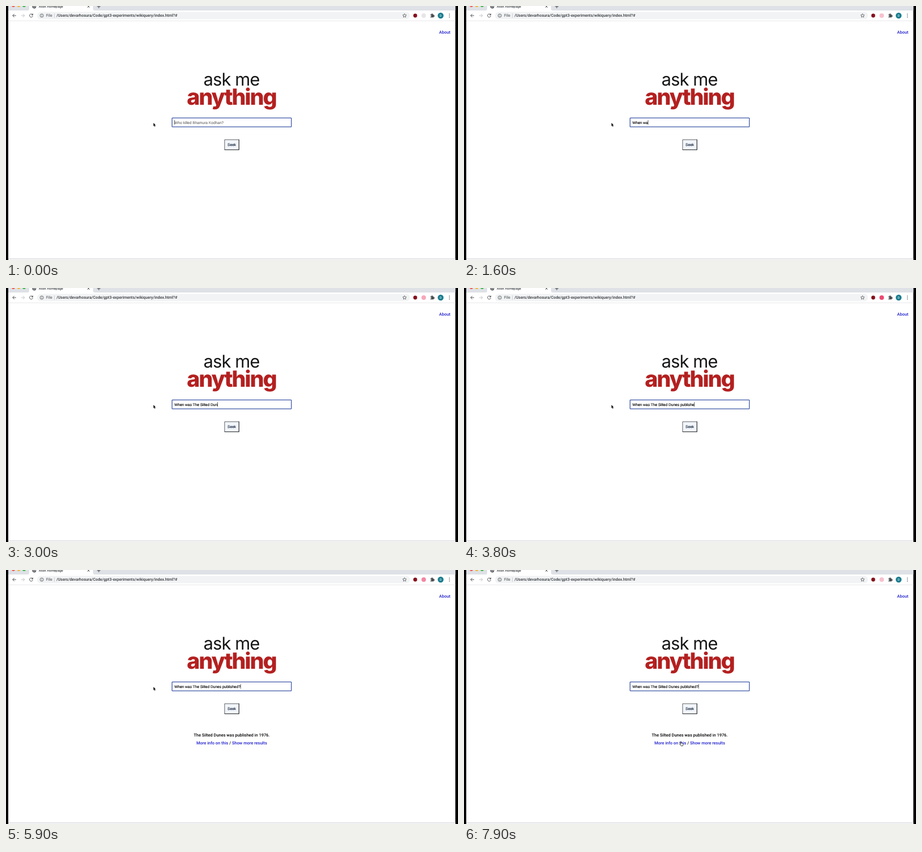
An HTML page that plays this animation: 800x450 px, repeating every 8 s.

```html
<!DOCTYPE html>
<html lang="en">
<head>
<meta charset="utf-8">
<title>AMA Homepage</title>
<style>
  html, body { margin: 0; width: 100%; height: 100%; overflow: hidden; background: #fff; }
  svg { display: block; width: 800px; height: 450px; }
  text { text-rendering: geometricPrecision; white-space: pre; }
  .ui { font-family: Roboto, sans-serif; font-weight: 500; }
  .page { font: 500 7.43px Roboto, sans-serif; fill: #000; }
  .field { font: 6.6px "Liberation Sans", Arial, sans-serif; stroke-width: .15px; }
  .logo { font-family: Inter, sans-serif; }
  .page .link, .link { fill: #1f1fcc; }
  .line { fill: none; stroke: #4a4d51; stroke-width: 1; }
  .thin { stroke-width: .8; }
  .faded { stroke: #c3c5c8; }
</style>
</head>
<body>
<svg viewBox="0 0 800 450">
  <rect width="800" height="450" fill="#000"/>
  <rect x="4" width="791.3" height="450" fill="#fff"/>

  <!-- tab strip -->
  <rect x="4" width="791.3" height="8" fill="#dee1e6"/>
  <path d="M38 8Q41 8 41 4.5V0H154V4.5Q154 8 157 8Z" fill="#fff"/>
  <circle cx="13" cy="-1" r="3" fill="#f2564d"/>
  <circle cx="22.5" cy="-1" r="3" fill="#f3b52f"/>
  <circle cx="32" cy="-1" r="3" fill="#35b944"/>
  <circle cx="50" cy="1" r="3.4" fill="#55585c"/>
  <path d="M48 0L50 1.5L49 3.5M51.5-1L52 2" stroke="#fff" stroke-width=".8" fill="none"/>
  <text class="ui" x="58" y="3" font-size="5.85" fill="#45494d">AMA Homepage</text>
  <path class="line" d="M144 -1.2L148 2.8M148 -1.2L144 2.8M161.2 1H167.2M164.2 -2V4"/>

  <!-- toolbar -->
  <path d="M4 26.3H795.3" stroke="#e3e4e6" stroke-width=".8"/>
  <rect x="55" y="10.4" width="660" height="13.2" rx="6.6" fill="#f1f3f4"/>
  <path class="line" d="M17.8 17H11.8M14.6 14.1L11.7 17L14.6 19.9"/>
  <path class="line faded" d="M26.8 17H32.8M30 14.1L32.9 17L30 19.9"/>
  <path class="line" d="M47 15.3A2.9 2.9 0 1 0 47.4 17.8M47.5 13.6V16H45"/>
  <circle class="line thin" cx="63.3" cy="17" r="3"/>
  <path class="line thin" d="M63.3 16.6V18.7M63.3 15.2V16"/>
  <g class="ui" font-size="6.95">
    <text x="71" y="19.4" fill="#63676b">File</text>
    <text x="89.3" y="19.4" fill="#303337">/Users/devarhosura/Code/gpt3-experiments/wikiquery/index.html?#</text>
  </g>
  <path d="M85.7 13.2V21" stroke="#bfc2c6" stroke-width=".8"/>
  <path id="star" class="line thin"/>
  <circle cx="724.3" cy="17" r="3.4" fill="#85101d"/>
  <circle id="rec" cx="739.3" cy="17" r="4"/>
  <path d="M751.2 15H753A1.2 1.2 0 1 1 755.2 15H757V16.6A1.2 1.2 0 1 1 757 18.7V20.3H751.2V18.6A1.1 1.1 0 1 0 751.2 16.6Z" fill="#4a4d51"/>
  <circle cx="769.3" cy="17" r="5.2" fill="#1c7d8f"/>
  <text class="ui" x="769.3" y="19" font-size="5.3" text-anchor="middle" fill="#d3edf0">D</text>
  <g fill="#4a4d51">
    <circle cx="784.8" cy="14.3" r=".8"/><circle cx="784.8" cy="17" r=".8"/><circle cx="784.8" cy="19.7" r=".8"/>
  </g>

  <!-- page -->
  <text class="page link" x="786.5" y="49.2" text-anchor="end">About</text>
  <text class="logo" x="349.6" y="140.6" font-size="31" letter-spacing="-.95" fill="#161616">ask me</text>
  <text class="logo" x="320" y="175" font-size="39.5" font-weight="800" letter-spacing="-2.1" fill="#b42020">anything</text>

  <rect x="293.9" y="198.4" width="211.2" height="15.8" rx=".8" fill="#fff" stroke="#3d56a6" stroke-width="1.3"/>
  <text id="query" class="field" x="298" y="208.5"></text>
  <rect id="caret" y="202.3" width=".7" height="7.8" fill="#111"/>

  <rect id="face" y="236.8" height="18.2" fill="#f2f6fb"/>
  <path id="light" fill="none" stroke-width=".9"/>
  <path id="dark" fill="none" stroke-width="1.1"/>
  <text id="label" class="field" x="399.6" y="248.2" text-anchor="middle"></text>

  <g id="answer" class="page" text-anchor="middle">
    <text x="399.5" y="295.2">The Silted Dunes was published in 1976.</text>
    <text x="399.5" y="308.9"><tspan class="link">More info on this</tspan> / <tspan class="link">Show more results</tspan></text>
  </g>

  <path d="M4 447.6H795.3" stroke="#d9dadc" stroke-width="1"/>
  <rect x="4" y="448" width="791.3" height="2" fill="#f1f2f3"/>

  <path id="arrow" d="M0 0V6L1.3 4.8L2.2 6.9L3.2 6.5L2.3 4.4H4.1Z" fill="#111" stroke="#fff" stroke-width=".4" paint-order="stroke"/>
  <path id="hand" d="M1.7 5V1.2Q2.3 .2 2.9 1.2V3.4L5.5 4Q6.5 4.3 6.4 5.3L5.9 8.3H2.5L.4 5.6Q.3 4.6 1.7 5.4Z" fill="#fff" stroke="#222" stroke-width=".8" stroke-linejoin="round"/>
</svg>
<script>
  const LOOP = 8000;
  const QUESTION = "When was The Silted Dunes published?";
  const HINT = "Who killed Bhamura Kodhan?";
  const SUBMIT = 4100, ANSWER = 5900;

  // time, characters typed
  const typing = [[800, 0], [900, 1], [1100, 1], [2100, 13], [2300, 14], [3800, 34], [4000, 36]];
  // time, x, y
  const pointer = [[6200, 261, 207], [6300, 272, 213], [6500, 332.5, 253.5], [6600, 345, 264],
                   [7100, 372, 297], [7600, 381, 303.3], [7900, 381.5, 303.3]];

  const $ = id => document.getElementById(id);
  const set = (id, attrs) => {
    for (const k in attrs) $(id).setAttribute(k, attrs[k]);
  };
  const show = (id, on) => set(id, { visibility: on ? "visible" : "hidden" });

  function track(keys, t, col = 1) {
    if (t <= keys[0][0]) return keys[0][col];
    for (let i = 1; i < keys.length; i++) {
      const a = keys[i - 1], b = keys[i];
      if (t <= b[0]) return a[col] + (b[col] - a[col]) * (t - a[0]) / (b[0] - a[0]);
    }
    return keys[keys.length - 1][col];
  }

  function starPath(cx, cy, r) {
    const points = Array.from({ length: 10 }, (_, i) => {
      const a = i * Math.PI / 5, d = i % 2 ? r * 0.48 : r;
      return (cx + d * Math.sin(a)).toFixed(2) + " " + (cy - d * Math.cos(a)).toFixed(2);
    });
    return "M" + points.join("L") + "Z";
  }

  // The screen refreshes on four of every five ticks.
  function tick(t) {
    const n = Math.floor(t / 100);
    return (n % 5 === 2 ? n - 1 : n) * 100;
  }

  function drawField(t) {
    const count = Math.floor(track(typing, t) + 1e-6);
    const query = $("query");
    const ink = count ? "#000" : "#757575";
    query.textContent = count ? QUESTION.slice(0, count) : HINT;
    set("query", { fill: ink, stroke: ink });
    const width = count ? query.getComputedTextLength() : 0;
    set("caret", { x: 298 + width });
    show("caret", count !== 1);
  }

  function drawButton(busy) {
    const left = busy ? 379.5 : 386.9, right = busy ? 419.6 : 412.3;
    const ink = busy ? "#b3b9c6" : "#14243c";
    set("face", { x: left, width: right - left });
    set("light", { d: `M${left} 255V236.9H${right}`, stroke: busy ? "#cdd2e0" : "#4a4d52" });
    set("dark", { d: `M${right} 236.5V254.8H${left}`, stroke: busy ? "#b9bfd0" : "#15181c" });
    set("label", { fill: ink, stroke: ink });
    $("label").textContent = busy ? "Loading..." : "Seek";
  }

  function drawPointer(t) {
    const x = track(pointer, t), y = track(pointer, t, 2);
    const overLink = y > 302;
    const transform = `translate(${x} ${y})`;
    set("arrow", { transform });
    set("hand", { transform });
    show("arrow", !overLink);
    show("hand", overLink);
  }

  function drawPulse(t) {
    const level = 0.5 + 0.5 * Math.cos((t - 1000) / 1500 * 2 * Math.PI);
    set("rec", t < 100 ? { fill: "#e6e6e8", "fill-opacity": 1 }
                       : { fill: "#e8285a", "fill-opacity": 0.22 + 0.75 * level });
  }

  function render(time) {
    const t = tick(time % LOOP);
    drawField(t);
    drawButton(t >= SUBMIT && t < ANSWER);
    show("answer", t >= ANSWER);
    drawPointer(t);
    drawPulse(t);
  }

  set("star", { d: starPath(705.4, 17.1, 3.5) });
  const start = performance.now();
  function loop() {
    render(performance.now() - start);
    requestAnimationFrame(loop);
  }
  loop();
</script>
</body>
</html>
```
